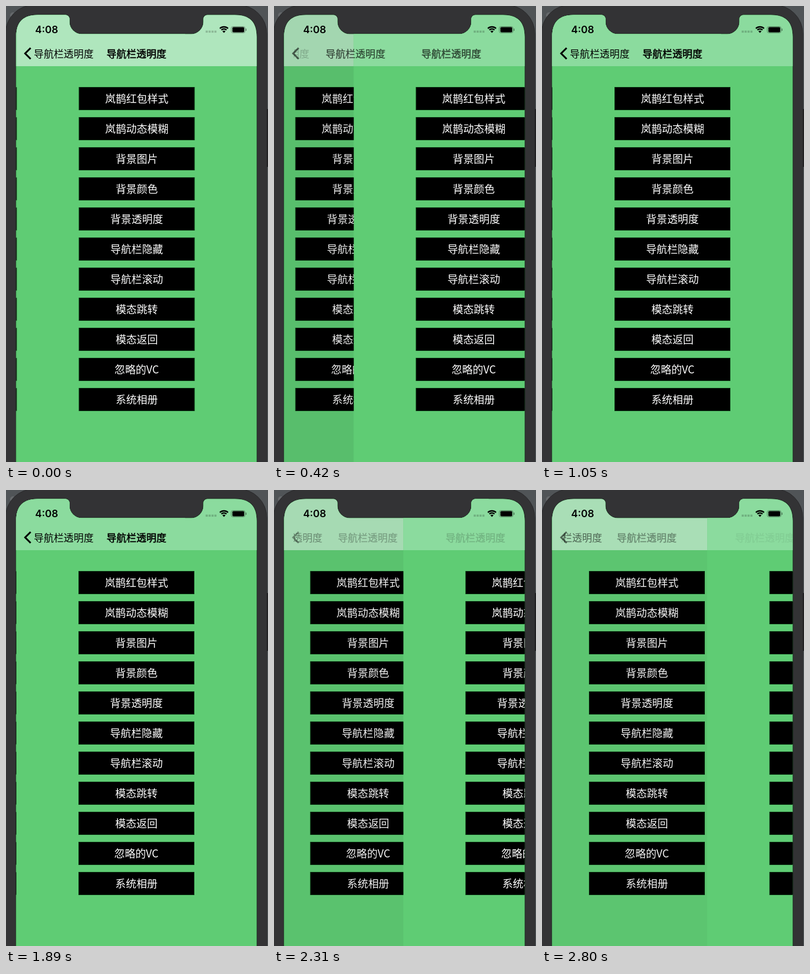
An HTML page with a canvas that plays this animation: 452x788 px, repeating every 2.87 s.

```html
<!DOCTYPE html>
<html lang="zh-CN">
<head>
<meta charset="utf-8">
<style>
html, body { margin: 0; width: 100%; height: 100%; overflow: hidden; background: #333335; }
canvas { display: block; }
</style>
</head>
<body>
<canvas id="stage" width="452" height="788"></canvas>
<script>
const ctx = document.getElementById('stage').getContext('2d');
const LOOP = 2870, STEP = 70, PUSH_AT = 280, DRAG_AT = 1890;
const LEFT = 18, WIDTH = 414, BAR_BOTTOM = 104;
const GREEN = '#5fcc74', BAR_LIGHT = '#afe6bd', BAR_GREEN = '#8bdb9e';
const CJK = '"Noto Sans CJK SC", "Noto Sans CJK", sans-serif';
const TITLE = '导航栏透明度';
const LABELS = ['岚鹊红包样式', '岚鹊动态模糊', '背景图片', '背景颜色', '背景透明度',
  '导航栏隐藏', '导航栏滚动', '模态跳转', '模态返回', '忽略的VC', '系统相册'];

// Critically damped spring, from 1 towards 0
const settle = x => (1 + x) * Math.exp(-x);

function rect(x, y, w, h, fill) {
  ctx.fillStyle = fill;
  ctx.fillRect(x, y, w, h);
}

function text(str, x, y, font, fill, align = 'center') {
  ctx.font = font;
  ctx.fillStyle = fill;
  ctx.textAlign = align;
  ctx.fillText(str, x, y);
}

// A stroke in the same colour gives the semibold weight of the titles
function barText(x, align, alpha, heavy) {
  ctx.globalAlpha = alpha;
  text(TITLE, x, 88.5, '17.2px ' + CJK, '#000', align);
  if (heavy) {
    ctx.strokeStyle = '#000';
    ctx.lineWidth = 0.5;
    ctx.strokeText(TITLE, x, 88.5);
  }
  ctx.globalAlpha = 1;
}

function screenPath(left, top, right, notch) {
  const p = new Path2D();
  p.moveTo(left, 800);
  p.lineTo(left, top + 38);
  p.bezierCurveTo(left, top + 12, left + 12, top, left + 38, top);
  p.lineTo(102, top);
  p.arcTo(109.5, top, 109.5, top + 7, 7);
  p.arcTo(109.5, notch, 133, notch, 21);
  p.lineTo(317, notch);
  p.arcTo(340.5, notch, 340.5, top + 7, 21);
  p.arcTo(340.5, top, 348, top, 7);
  p.lineTo(right - 38, top);
  p.bezierCurveTo(right - 12, top, right, top + 12, right, top + 38);
  p.lineTo(right, 800);
  p.closePath();
  return p;
}
const screen = screenPath(17.5, 15.5, 432.5, 48.5);

function drawPhone() {
  rect(0, 0, 452, 788, '#505457');
  ctx.fillStyle = '#66696c';
  ctx.beginPath();
  ctx.arc(12, 16, 5, 0, 7);
  ctx.fill();
  ctx.beginPath();
  ctx.roundRect(-1, -2, 451, 900, 50);
  ctx.fillStyle = '#333335';
  ctx.strokeStyle = '#29292b';
  ctx.lineWidth = 1;
  ctx.fill();
  ctx.stroke();
  rect(450, 178, 2, 100, '#222224');
  ctx.strokeStyle = '#1e2a21';
  ctx.lineWidth = 2;
  ctx.stroke(screen);
}

function drawPage(x, bar) {
  rect(x, 0, WIDTH + 1, 788, GREEN);
  rect(x, 0, WIDTH + 1, BAR_BOTTOM, bar);
  LABELS.forEach((label, i) => {
    const y = 140 + 52 * i;
    rect(x + 107, y, 200, 40, '#0a3312');
    rect(x + 108, y + 1, 198, 38, '#000');
    text(label, x + 207, y + 27, '18.2px ' + CJK, '#fff');
  });
}

// rest: 1 shows the lower page's bar items, 0 the upper page's
function drawBarItems(rest, dragging) {
  const done = 1 - rest, fade = dragging ? 3 : 1.4;
  const upper = done ** fade, lower = rest ** fade;
  ctx.save();
  ctx.beginPath();
  ctx.rect(34, 50, 400, 54);
  ctx.clip();
  barText(48 - 134 * done, 'left', rest ** 1.4);
  barText(225 - 125.5 * done, 'center', lower, true);
  barText(48 + 125.5 * rest, 'left', upper);
  barText(225 + 247 * rest, 'center', upper, true);
  ctx.restore();

  ctx.globalAlpha = 0.35 + 0.65 * Math.abs(2 * done - 1);
  ctx.strokeStyle = '#000';
  ctx.lineWidth = 3;
  ctx.beginPath();
  ctx.moveTo(42.5, 72.5);
  ctx.lineTo(33, 82);
  ctx.lineTo(42.5, 91.5);
  ctx.stroke();
  ctx.globalAlpha = 1;
}

function drawStatus() {
  text('4:08', 70, 47, '600 17.4px Inter, sans-serif', '#000');
  for (let i = 0; i < 4; i++) rect(344.5 + 5 * i, 42.5, 3.6, 3.6, 'rgba(0,0,0,.2)');
  ctx.strokeStyle = '#000';
  ctx.lineWidth = 2.3;
  for (const r of [10, 6.3]) {
    ctx.beginPath();
    ctx.arc(376, 46, r, -Math.PI * 0.75, -Math.PI * 0.25);
    ctx.stroke();
  }
  ctx.fillStyle = '#000';
  ctx.beginPath();
  ctx.moveTo(376, 46.5);
  ctx.arc(376, 46.5, 3.8, -Math.PI * 0.75, -Math.PI * 0.25);
  ctx.fill();
  ctx.strokeStyle = 'rgba(0,0,0,.35)';
  ctx.lineWidth = 1;
  ctx.beginPath();
  ctx.roundRect(388.5, 35.5, 24, 11, 3);
  ctx.stroke();
  rect(413.5, 39, 1.5, 4, 'rgba(0,0,0,.4)');
  ctx.fillStyle = '#000';
  ctx.beginPath();
  ctx.roundRect(390.5, 36.5, 20.5, 9, 1.8);
  ctx.fill();
}

function poseAt(t) {
  const spring = start => WIDTH * settle(17.8 * (t - start) / 1000);
  if (t < PUSH_AT) return { offset: spring(-500), rest: 0, bar: BAR_LIGHT };
  if (t < DRAG_AT) {
    const u = Math.min(1, (t - PUSH_AT) / 345);
    return { offset: spring(PUSH_AT), rest: (1 - u) ** 4 * (1 + 4 * u), bar: BAR_GREEN };
  }
  const offset = 272.6 * (1 - settle(6.45 * (t - DRAG_AT) / 1000));
  return { offset, rest: offset / WIDTH, bar: BAR_GREEN, dragging: true };
}

function draw(t) {
  const { offset, rest, bar, dragging } = poseAt(t);
  const edge = LEFT + offset, hidden = 1 - offset / WIDTH;
  drawPhone();
  ctx.save();
  ctx.clip(screen);
  rect(0, 0, LEFT, 788, GREEN);
  rect(0, 0, LEFT, BAR_BOTTOM, bar);
  drawPage(LEFT - 0.3 * WIDTH * hidden, BAR_LIGHT);
  rect(0, 0, edge, 788, `rgba(0,0,0,${0.1 * hidden})`);
  drawPage(edge, bar);
  drawBarItems(rest, dragging);
  drawStatus();
  ctx.restore();
}

const start = performance.now();
function tick() {
  const t = (performance.now() - start) % LOOP;
  draw(Math.floor(t / STEP) * STEP);
  requestAnimationFrame(tick);
}
tick();
</script>
</body>
</html>
```
